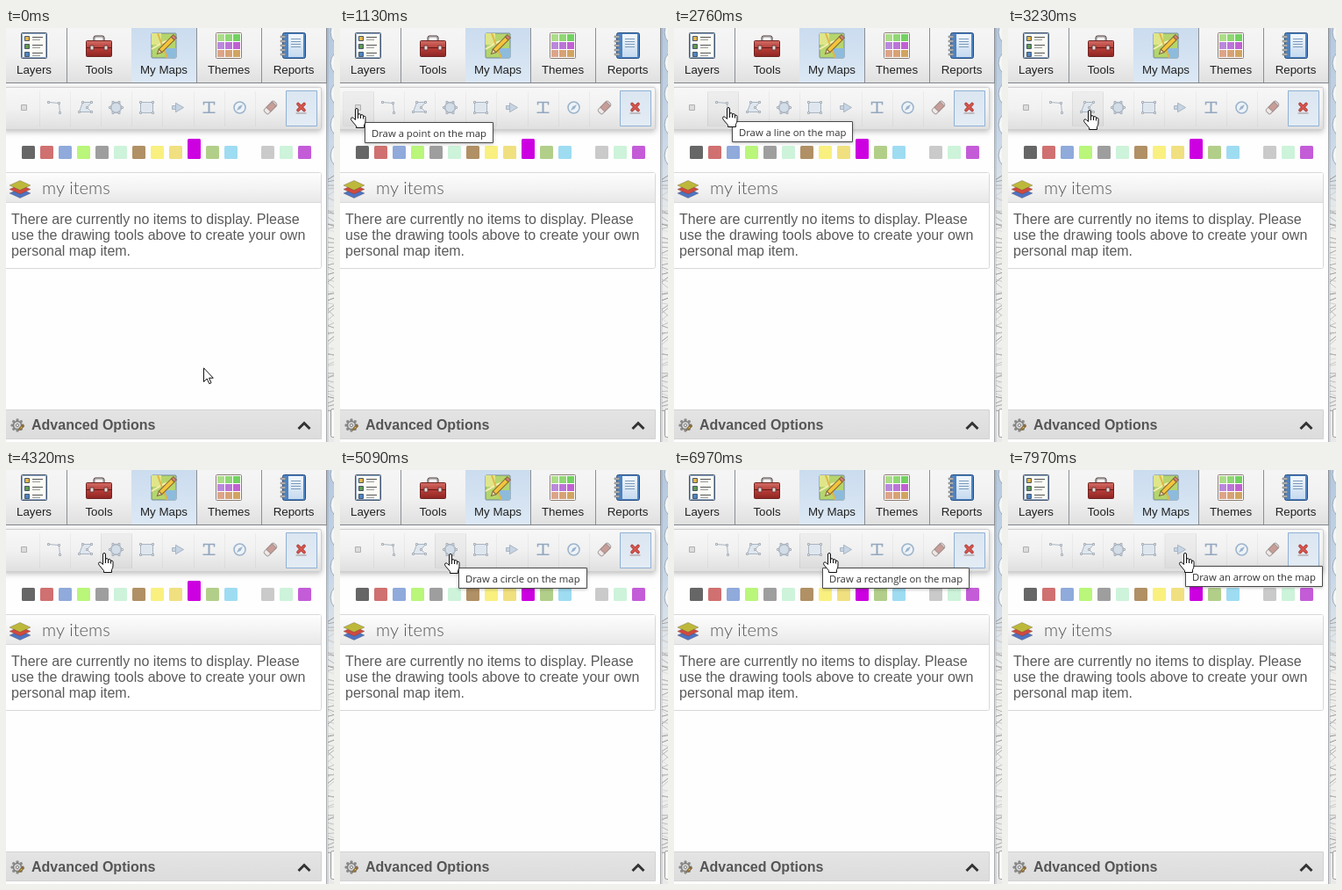
Animation of 374 by 471 pixels, one loop 8000 ms. Source, as an HTML page with a canvas:

```html
<!DOCTYPE html>
<html lang="en">
<head>
<meta charset="utf-8">
<title>Drawing tools</title>
<style>
html, body { margin: 0; width: 100%; height: 100%; overflow: hidden; background: #fff; }
canvas { display: block; }
</style>
</head>
<body>
<canvas id="stage" width="374" height="471"></canvas>
<script>
const ctx = document.getElementById('stage').getContext('2d');
const LOOP = 8000, STEP = 78;
const SANS = '"Liberation Sans", Arial, sans-serif';
const TIP_FONT = '11.3px "Open Sans", "Noto Sans", sans-serif';

// Where the pointer rests, when it sets off and arrives, and when the tooltip opens
const stops = [
  { x: 225, y: 386, leave: 0, arrive: 0 },
  { x: 18, y: 91, leave: 70, arrive: 670, tip: 1130, label: 'a point' },
  { x: 56, y: 90, leave: 1510, arrive: 1980, tip: 2440, label: 'a line' },
  { x: 92, y: 93, leave: 2760, arrive: 3230, tip: 3770, label: 'a polygon' },
  { x: 125, y: 95, leave: 4080, arrive: 4560, tip: 5090, label: 'a circle' },
  { x: 159, y: 95, leave: 5570, arrive: 5720, tip: 6180, label: 'a rectangle' },
  { x: 192, y: 93, leave: 6740, arrive: 7130, tip: 7970, label: 'an arrow' },
  { x: 201, y: 94, leave: 7970, arrive: 7970 }
];

// The pointer moves in even time steps, on a straight line
function pointerAt(t) {
  const i = stops.findLastIndex(s => t >= s.leave);
  const to = stops[i], from = stops[Math.max(0, i - 1)];
  const steps = Math.round((to.arrive - to.leave) / STEP) + 1;
  const p = Math.min(1, (Math.floor((t - to.leave) / STEP) + 1) / steps);
  const mix = key => Math.round(from[key] + (to[key] - from[key]) * p);
  return { x: mix('x'), y: mix('y') };
}

function buttonAt({ x, y }) {
  return y > 71 && y < 113 ? Math.floor((x - 3) / 35) : -1;
}

function seeded(seed) {
  return () => (seed = seed * 16807 % 2147483647) / 2147483647;
}

function paint(fill, stroke, width = 1) {
  if (fill) { ctx.fillStyle = fill; ctx.fill(); }
  if (stroke) { ctx.strokeStyle = stroke; ctx.lineWidth = width; ctx.stroke(); }
}

function rect(x, y, w, h, fill, stroke, r = 0) {
  ctx.beginPath();
  ctx.roundRect(x, y, w, h, r);
  paint(fill, stroke);
}

function box(size, fill, stroke, r) {
  rect(-size / 2, -size / 2, size, size, fill, stroke, r);
}

function disc(x, y, r, fill, stroke, width) {
  ctx.beginPath();
  ctx.arc(x, y, r, 0, 7);
  paint(fill, stroke, width);
}

function poly(points, fill, stroke, width, closed = true) {
  ctx.beginPath();
  points.forEach(([x, y]) => ctx.lineTo(x, y));
  if (closed) ctx.closePath();
  paint(fill, stroke, width);
}

function ring(n, rx, ry = rx, turn = 0) {
  return Array.from({ length: n }, (_, i) => {
    const a = turn + i * 2 * Math.PI / n;
    return [rx * Math.cos(a), ry * Math.sin(a)];
  });
}

function fade(y0, y1, ...colors) {
  const g = ctx.createLinearGradient(0, y0, 0, y1);
  colors.forEach((c, i) => g.addColorStop(i / (colors.length - 1), c));
  return g;
}

function text(str, x, y, font, color, align = 'left') {
  ctx.font = font;
  ctx.fillStyle = color;
  ctx.textAlign = align;
  ctx.fillText(str, x, y);
}

function at(x, y, draw, angle = 0) {
  ctx.save();
  ctx.translate(x, y);
  ctx.rotate(angle);
  draw();
  ctx.restore();
}

function shadowed(blur, offset, draw) {
  ctx.save();
  ctx.shadowColor = 'rgba(0,0,0,.25)';
  ctx.shadowBlur = blur;
  ctx.shadowOffsetY = offset;
  draw();
  ctx.restore();
}

function pencil(length, width) {
  rect(0, -width / 2, length, width, '#f4c43c', '#80663a');
  rect(length, -width / 2, width * .7, width, '#d87f74', '#80663a');
  poly([[0, -width / 2], [-width, 0], [0, width / 2]], '#f3dfb8', '#80663a');
}

function layersIcon() {
  box(29, '#fcfcf6', '#46566c', 1);
  box(27, null, '#8fa6c4');
  ['#e2b548', '#5f9a4c', '#4f83c0'].forEach((c, i) => {
    const y = 9 * i - 11;
    rect(-10.5, y + .5, 5, 5, c, '#49586c');
    rect(-2, y + 1, 12, 1, '#555');
    rect(-2, y + 4, 9, 1, '#999');
  });
}

function toolboxIcon() {
  rect(-6, -11, 12, 9, null, '#4c3030', 2);
  rect(-5, -10, 10, 8, null, '#888', 2);
  rect(-14.5, -5.5, 29, 18, fade(-5, 12, '#cf6a62', '#b83b36', '#8f2724'), '#6e2422', 1);
  rect(-14, 2, 28, 1, '#5d1c1a');
  for (const x of [-10, 6]) rect(x, 0, 4, 5, '#e7dcd8', '#6d3a3a');
}

function mapIcon() {
  box(28, '#b5d56c', '#6f8798', 1);
  rect(-14, -14, 11, 13, '#dfe58a');
  rect(2, 3, 12, 11, '#8dbbdc');
  poly([[-14, 4], [0, -4], [14, -8]], null, '#f6edb0', 2, false);
  poly([[-7, -14], [-2, 0], [4, 14]], null, '#e0b648', 2, false);
  at(-4, 6, () => pencil(20, 5), -Math.PI / 4);
}

function themesIcon() {
  box(29, '#fff', '#8a7c72', 1);
  for (let i = 0; i < 9; i++) {
    const row = Math.floor(i / 3), col = i % 3;
    const hue = [95, 275, 20][row] + col * 8;
    rect(-13 + col * 9, -13 + row * 9, 8, 8, `hsl(${hue} 55% ${70 - col * 5}%)`);
  }
}

function reportIcon() {
  rect(-12.5, -14.5, 26, 29, '#4d83c2', '#294f80', 2);
  rect(-6, -13, 17, 26, fade(-13, 14, '#f2f7fc', '#c4d9ef'));
  for (let y = -8; y < 2; y += 3) rect(-3, y, 11, 1, '#7d9abb');
  for (let y = -11; y < 13; y += 5) rect(-15, y, 6, 2, '#e0e0e0', '#777', 1);
}

const tabs = { 'Layers': layersIcon, 'Tools': toolboxIcon, 'My Maps': mapIcon, 'Themes': themesIcon, 'Reports': reportIcon };

function drawTabs() {
  rect(0, 0, 365, 62, fade(0, 62, '#f5f5f5', '#f1f1f1', '#e0e0e0'));
  Object.entries(tabs).forEach(([label, icon], i) => {
    const left = 74 * i - 5, mid = left + 37;
    if (label === 'My Maps') rect(left, 0, 74, 62, fade(0, 62, '#cbdcef', '#dce8f4'));
    at(mid, 20, icon);
    text(label, mid, 52, '13.33px ' + SANS, '#222', 'center');
    rect(left + 74, 0, 1, 62, '#8b8f94');
  });
  rect(0, 62, 366, 1, '#80858b');
}

const INK = '#a9b5c3', PALE = '#dfe6ee';

function outline(points, fill, closed = true) {
  poly(points, fill, INK, 1, closed);
  points.forEach(([x, y]) => rect(x - 1, y - 1, 2, 2, '#eef1f4', '#a5acb5'));
}

const corners = [[-7, -6], [7, -6], [7, 6], [-7, 6]];

const tools = [
  () => box(6, '#dcdcdc', '#b0b0b0'),
  () => outline([[-7, -6], [5, -5], [6, 6]], null, false),
  () => outline([[-3, -6], [7, -6], [2, 0], [7, 5], [-7, 5]], PALE),
  () => {
    outline(ring(6, 7), PALE);
    disc(0, 0, 5.5, '#d3dde7', INK);
  },
  () => outline(corners, PALE),
  () => {
    rect(-7, -2, 8, 4, '#c6d4e3', INK);
    poly(ring(3, 6), '#c6d4e3', INK);
  },
  () => {
    poly([[-6, -3], [-6, -6], [6, -6], [6, -3]], null, '#93a7bf', 1.6, false);
    rect(-1, -6, 2, 12, '#93a7bf');
    rect(-7, 5, 14, 1.5, '#93a7bf');
  },
  () => {
    disc(0, 0, 6.5, '#edf3f8', '#9db4cc', 1.6);
    at(0, 0, () => poly(ring(4, 5, 1.6), '#9db4cc'), -Math.PI / 4);
  },
  () => at(0, 0, () => {
    rect(-8, -3.5, 16, 7, '#efe8e6', '#a39c9c', 2);
    rect(-3, -3.5, 9, 7, '#c79d97', '#a08e8c');
  }, -Math.PI / 4),
  () => {
    ctx.lineCap = 'round';
    for (const [color, width] of [['#a63a34', 3.6], ['#d9574e', 2]])
      for (const s of [-1, 1]) poly([[-3.5 * s, -4], [3.5 * s, 3]], null, color, width, false);
    rect(-6, 6, 12, 1, '#a08c8c');
  }
];

function drawToolbar(hover) {
  shadowed(6, 2, () => rect(-4, 67, 364, 49, '#eee', null, 2));
  rect(-4.5, 67.5, 364, 48, fade(67, 116, '#f7f7f7', '#f1f1f1', '#dfdfdf'), '#cfcfcf', 2);
  tools.forEach((icon, i) => {
    const x = Math.round(3 + 35.1 * i), last = i === tools.length - 1;
    if (last) rect(x + .5, 71.5, 35, 40, fade(71, 112, '#dbe6f1', '#e4ecf4'), '#8fb1d6');
    else rect(x + 35, 72, 1, 40, 'rgba(0,0,0,.04)');
    if (i === hover) rect(x + .5, 72.5, 35, 39, 'rgba(0,0,0,.03)', 'rgba(0,0,0,.03)', 1);
    at(x + 17.5, 90.5, icon);
  });
}

const swatches = ['#666666', '#d07070', '#8faadb', '#b9f67a', '#9e9e9e', '#cdf3da', '#b09064', '#f9f080',
  '#f0e080', '#cc00e0', '#b2cf8a', '#9edcf2', '', '#cacaca', '#cdf3da', '#c45cd8'];

function drawSwatches(selected) {
  swatches.forEach((color, i) => {
    const rise = i === selected ? 8 : 0;
    if (color) rect(18 + 21 * i, 134 - rise, 15, 15 + rise, color, null, 1.5);
  });
}

function drawItems() {
  rect(-4.5, 164.5, 364, 109, '#fff', '#d8d8d8', 2);
  rect(-4, 165, 363, 33, fade(165, 198, '#fdfdfd', '#f4f4f4', '#e8e8e8'));
  rect(-4, 198, 363, 1, '#dadada');
  ['#4f74c4', '#cf4a40', '#bdb83a'].forEach((color, i) =>
    at(16, 188 - 4.5 * i, () => poly(ring(4, 12, 5.5), color, 'rgba(70,60,50,.4)', .7)));
  text('my items', 41, 189, '300 20px Lato, sans-serif', '#555');
  ['There are currently no items to display. Please',
    'use the drawing tools above to create your own',
    'personal map item.'].forEach((line, i) =>
    text(line, 6, 223 + 18 * i, '16px ' + SANS, '#5a5a5a'));
}

function drawAdvanced() {
  rect(-4.5, 434.5, 364, 33, fade(434, 468, '#e4e4e4', '#dcdcdc'), '#d2d2d2');
  at(13, 452, () => {
    ring(8, 6).forEach(([x, y]) => disc(x, y, 1.7, '#8a8a8a'));
    disc(0, 0, 4.5, '#d6d6d6', '#808080', 1.6);
    disc(0, 0, 1.6, '#f5f5f5', '#808080');
    at(3, 4, () => pencil(4, 2), -Math.PI / 4);
  });
  text('Advanced Options', 29, 457, 'bold 16px ' + SANS, '#555');
  poly([[333.5, 456], [340, 449.5], [346.5, 456]], null, '#333', 3, false);
}

function drawMap() {
  rect(365, 0, 9, 471, fade(0, 471, '#b5c8de', '#c6d6e7', '#efefed', '#f0f0ee', '#e8e9e8'));
  for (let y = 5; y < 150; y += 35) disc(386, y, 16, '#f3f5f7', '#9eaab6');
  const random = seeded(7);
  for (let y = 165; y < 430; y += 4) {
    const shade = 150 + 80 * random();
    poly([[367, y + 8 * random()], [375, y + 8 * random()]], null, `rgb(${shade},${shade},${shade})`, 1, false);
  }
  rect(370.5, 433.5, 10, 32, '#fafafa', '#999', 2);
  rect(365, 0, 1, 471, '#a8adb2');
  rect(366, 0, 2, 471, 'rgba(0,0,0,.08)');
}

function drawTip({ x, y, label }) {
  const words = `Draw ${label} on the map`;
  ctx.font = TIP_FONT;
  const width = Math.round(ctx.measureText(words).width) + 16;
  at(x + 10, y + 16, () => {
    shadowed(3, 1, () => rect(0, 0, width, 24, '#fff'));
    rect(.5, .5, width - 1, 23, '#fff', '#4a4a4a');
    text(words, 8, 17, TIP_FONT, '#333');
  });
}

const hand = new Path2D('M5.5 13.5V2a1.5 1.5 0 0 1 3 0V8a1.5 1.5 0 0 1 3 .3v.6a1.5 1.5 0 0 1 3 .4v.7' +
  'a1.3 1.3 0 0 1 2.5 .5V15q0 2.5-1.5 4.5V22.5H6.5V20.5L1.2 14.2Q-.2 12.3 1 11.2Q2.4 10.4 3.8 11.8Z');
const fingers = new Path2D('M8.5 8v4M11.5 8.5v3.5M14.5 9.5v3');
const arrow = new Path2D('M.5 .8V16.5L4.2 13L6.8 18.7L9 17.7L6.5 12.2H11.3Z');

function drawPointer({ x, y }, overButton) {
  at(overButton ? x - 6 : x, y, () => {
    const shape = overButton ? hand : arrow;
    ctx.fillStyle = '#fff';
    ctx.strokeStyle = '#111';
    ctx.lineWidth = 1;
    ctx.fill(shape);
    ctx.stroke(shape);
    if (overButton) ctx.stroke(fingers);
  });
}

function render(t) {
  const pointer = pointerAt(t), hover = buttonAt(pointer);
  rect(0, 0, 374, 471, '#fefefe');
  drawMap();
  drawTabs();
  drawToolbar(hover);
  drawSwatches(9);
  drawItems();
  drawAdvanced();
  const tip = stops.find(s => s.label && t >= s.tip && buttonAt(s) === hover);
  if (tip) drawTip(tip);
  drawPointer(pointer, hover >= 0);
}

const began = performance.now();
function tick() {
  render((performance.now() - began) % LOOP);
  requestAnimationFrame(tick);
}
tick();
</script>
</body>
</html>
```
